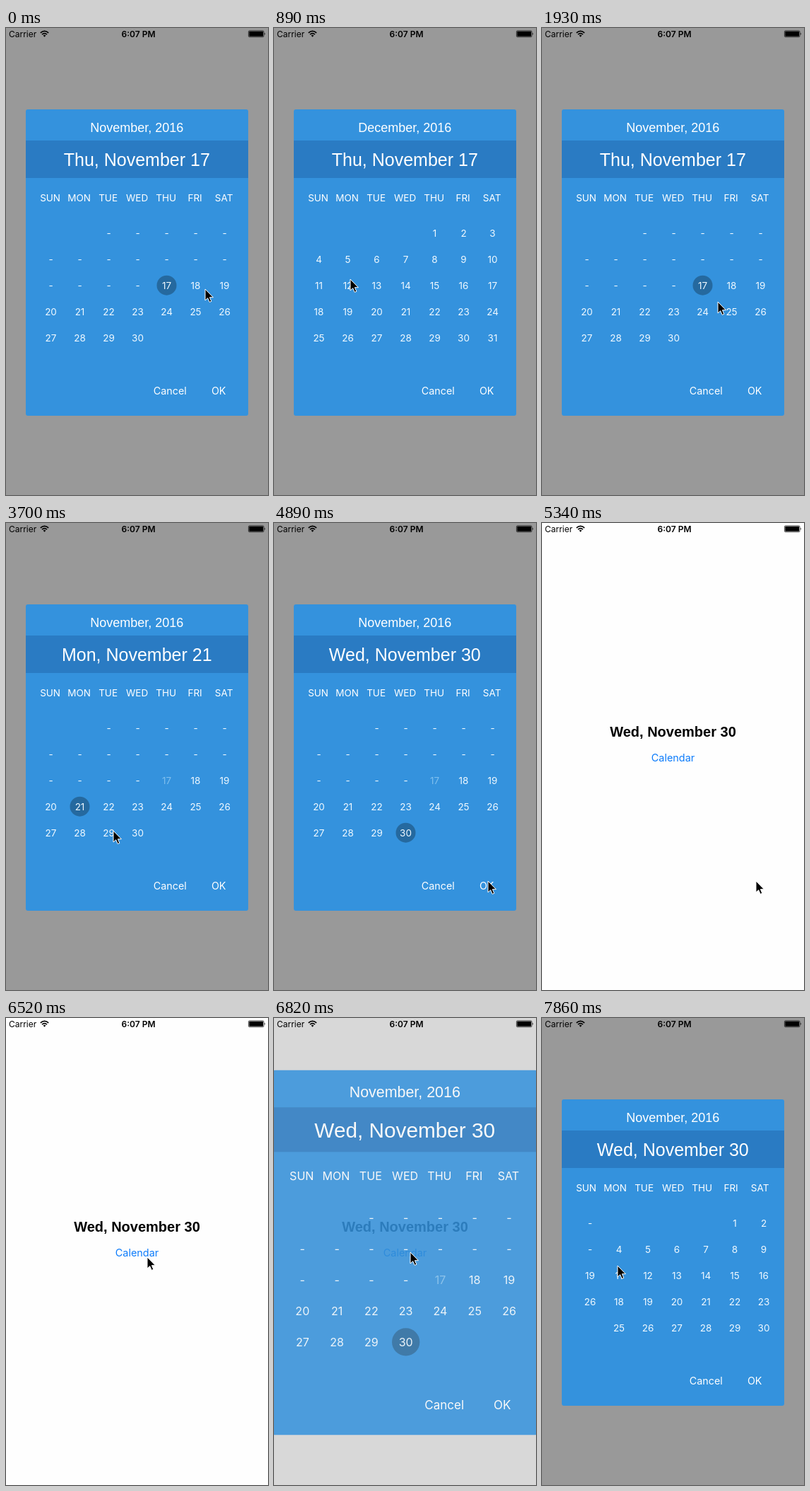
Animation of 371x660 px, one loop 8000 ms. Source, as an HTML page:

```html
<!DOCTYPE html>
<html lang="en">
<head>
<meta charset="utf-8">
<title>Calendar picker</title>
<style>
  html, body { margin: 0; width: 100%; height: 100%; overflow: hidden; background: #fefefe; }
  svg { display: block; width: 371px; height: 660px; }
  text { font-family: Inter, "Noto Sans", sans-serif; }
  .helv { font-family: "Liberation Sans", Helvetica, sans-serif; }
  .mid { text-anchor: middle; }
  .dialog text { fill: #fff; }
  .dialog .day { font-size: 13.5px; fill: #f0f9ff; }
  .dialog .today { fill: #7fbfee; }
</style>
</head>
<body>
<svg viewBox="0 0 371 660">
  <defs>
    <clipPath id="pager"><rect x="43" y="270" width="287" height="190"/></clipPath>
  </defs>
  <rect width="371" height="660" fill="#fefefe"/>
  <text class="helv mid" x="185.5" y="302" font-size="20" font-weight="700">Wed, November 30</text>
  <text class="mid" x="185.5" y="337" font-size="14.4" fill="#0b7bfb">Calendar</text>
  <rect id="dim" width="371" height="660"/>

  <g id="status">
    <text x="4" y="12.8" font-size="12">Carrier</text>
    <g fill="none" stroke="#000" stroke-width="1.7">
      <path d="M48.8 6.9Q54.5 1.8 60.2 6.9"/>
      <path d="M51 9.2Q54.5 6 58 9.2"/>
    </g>
    <path d="M52.6 10.6Q54.5 9 56.4 10.6L54.5 12.7Z"/>
    <text class="mid" x="187.5" y="12.8" font-size="12" font-weight="600">6:07 PM</text>
    <rect x="343.4" y="3.9" width="21.6" height="8.8" rx="1.4" fill="none" stroke="#000" stroke-width=".7"/>
    <rect x="344.3" y="4.8" width="19.8" height="7" rx=".6"/>
    <path d="M366 6.6Q367.8 8.3 366 10Z"/>
  </g>

  <g id="dialog" class="dialog">
    <rect x="28" y="115" width="315" height="433" rx="3" fill="#3492dd"/>
    <rect x="28" y="159" width="315" height="53" fill="#2a7bc3"/>
    <text id="month" class="helv mid" x="185.3" y="147" font-size="18"></text>
    <text id="date" class="helv mid" x="185.3" y="195" font-size="25"></text>
    <g id="weekdays" font-size="13.5"></g>
    <g clip-path="url(#pager)"><g id="pages"></g></g>
    <text class="mid" x="232.3" y="517.5" font-size="14.3">Cancel</text>
    <text class="mid" x="301.2" y="517.5" font-size="14.3">OK</text>
  </g>

  <path id="cursor" d="M0 0V16L3.7 12.7L6.2 18.4L8.8 17.3L6.4 11.7H11.4Z" stroke="#fff" stroke-width="1" stroke-linejoin="round"/>
</svg>
<script>
const LOOP = 8000, STEPS = 54;
const COL = 41, ROW = 37, PAGE = 7 * COL;
const TODAY = 17, NOV_START = 2, DEC_START = 4;
const WEEK = ["Sun", "Mon", "Tue", "Wed", "Thu", "Fri", "Sat"];
const $ = id => document.getElementById(id);

function add(parent, tag, attrs, content = "") {
  const el = document.createElementNS("http://www.w3.org/2000/svg", tag);
  for (const key in attrs) el.setAttribute(key, attrs[key]);
  el.textContent = content;
  return parent.appendChild(el);
}

// Centre of a day's cell in a month that starts on the given weekday.
function cell(day, start) {
  const i = day - 1 + start;
  return { x: 63.5 + i % 7 * COL, y: 290 + Math.floor(i / 7) * ROW };
}

function addMonth(start, days, firstEnabled, shift) {
  const labels = {};
  for (let day = 1; day <= days; day++) {
    const { x, y } = cell(day, start);
    labels[day] = add($("pages"), "text", { class: "day mid", x: x + shift, y: y + 4.8 },
      day < firstEnabled ? "-" : day);
  }
  return labels;
}

WEEK.forEach((name, i) =>
  add($("weekdays"), "text", { class: "mid", x: 62.6 + i * COL, y: 245 }, name.toUpperCase()));
const marker = add($("pages"), "circle", { fill: "#000", "fill-opacity": .28 });
const november = addMonth(NOV_START, 30, TODAY, 0);
addMonth(DEC_START, 31, 1, PAGE);

// Tracks: [step, ...values]
const cursorTrack = [
  [2, 282, 369], [3, 268, 368], [4, 165, 360], [6, 108, 355], [8, 108, 355],
  [9, 140, 360], [10, 222, 374], [11, 250, 381], [13, 249, 387],
  [16, 128, 402], [18, 104, 404], [24, 112, 408], [25, 152, 435],
  [27, 184, 438], [30, 188, 440], [32, 293, 496], [33, 303, 506],
  [38, 303, 506], [39, 300, 500], [44, 200, 338], [46, 193, 331],
  [50, 270, 433], [51, 270, 433], [52, 225, 405], [53, 107, 350]];
const pageTrack = [
  [2, 0], [3, -20], [4, -190], [5, -277], [6, -287], [8, -287],
  [9, -252], [10, -84], [11, -4], [12, 0], [51, 0], [52, -38], [53, -241.5]];
// scale, opacity, backdrop
const dialogTrack = [
  [34, 1, 1, .4], [35, 1.1, .45, .2], [36, 1.2, 0, 0],
  [45, 1.2, 0, 0], [46, 1.19, .85, .149], [47, 1.03, 1, .34], [48, 1, 1, .4]];
const markerTrack = [
  [18, 14], [19, 16.5], [20, 14], [27, 14], [28, 16.5], [29, 14],
  [45, 14], [46, 16.5], [47, 14]];

function at(track, step) {
  const next = track.findIndex(key => key[0] >= step);
  if (next === 0) return track[0].slice(1);
  if (next < 0) return track[track.length - 1].slice(1);
  const a = track[next - 1], b = track[next];
  const k = (step - a[0]) / (b[0] - a[0]);
  return a.slice(1).map((v, i) => v + (b[i + 1] - v) * k);
}

function draw(time) {
  const step = Math.min(STEPS - 1, Math.floor((time + 8) * STEPS / LOOP));
  const day = step < 19 ? TODAY : step < 28 ? 21 : 30;
  const [scale, opacity, dim] = at(dialogTrack, step);
  const spot = cell(day, NOV_START);

  $("cursor").setAttribute("transform", `translate(${at(cursorTrack, step)})`);
  $("pages").setAttribute("transform", `translate(${at(pageTrack, step)})`);
  $("dialog").setAttribute("transform",
    `translate(185.5 331.5) scale(${scale}) translate(-185.5 -331.5)`);
  $("dialog").setAttribute("opacity", opacity);
  $("dim").setAttribute("opacity", dim);

  marker.setAttribute("cx", spot.x);
  marker.setAttribute("cy", spot.y - .3);
  marker.setAttribute("r", at(markerTrack, step)[0]);
  november[TODAY].classList.toggle("today", day !== TODAY);

  $("month").textContent = (step >= 6 && step < 12 ? "December" : "November") + ", 2016";
  $("date").textContent = `${WEEK[(day - 1 + NOV_START) % 7]}, November ${day}`;
}

const start = performance.now();
function tick() {
  draw((performance.now() - start) % LOOP);
  requestAnimationFrame(tick);
}
tick();
</script>
</body>
</html>
```
